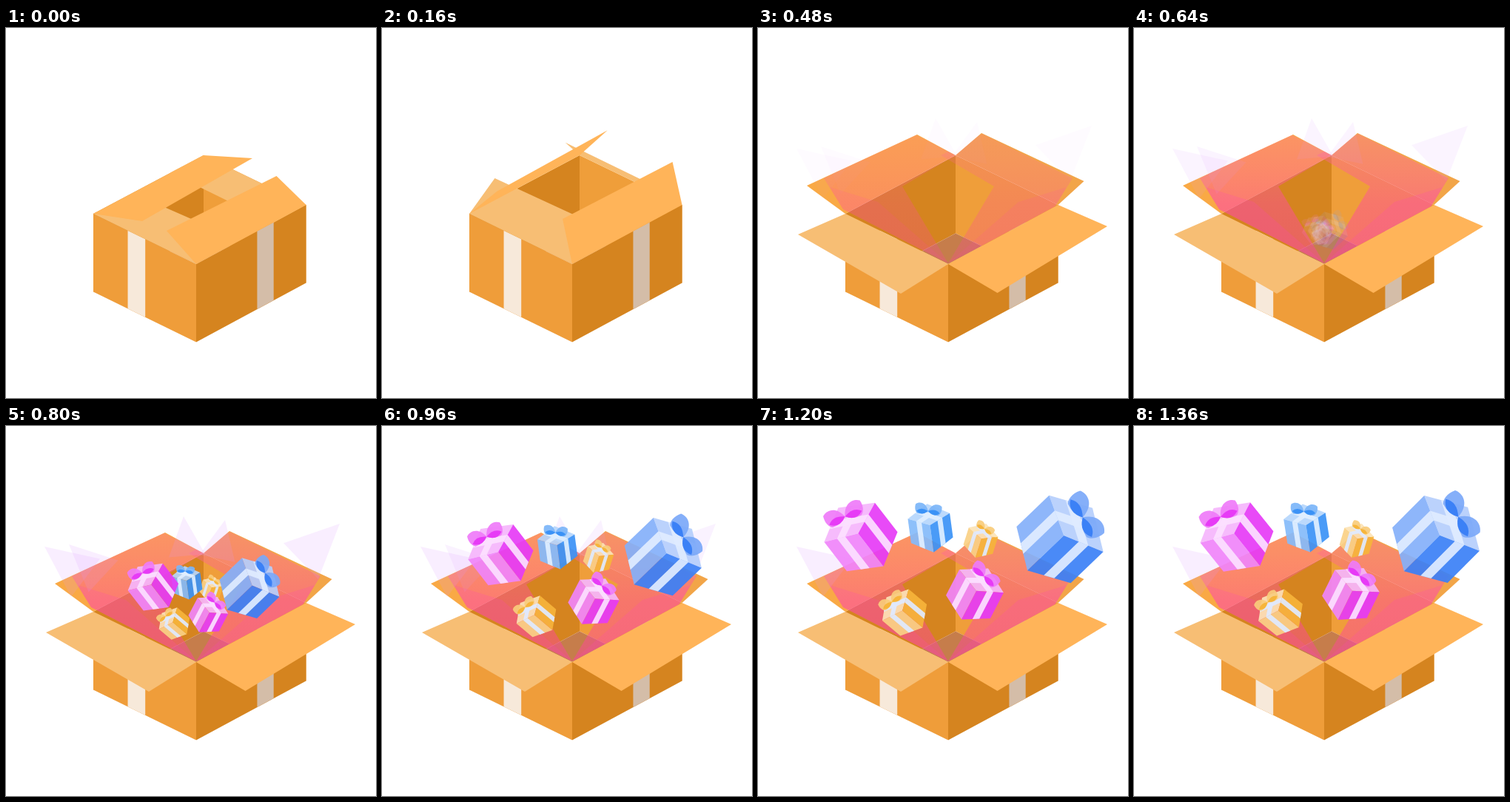
Recreate the animation shown at these times as an HTML page with a canvas. Size 500 by 500 pixels, loop 1.4 s.

```html
<!DOCTYPE html>
<html lang="en">
<head>
<meta charset="utf-8">
<title>Gift box</title>
<style>
html, body { margin: 0; width: 100%; height: 100%; overflow: hidden; background: #fff; }
canvas { display: block; width: 100vw; height: 100vh; }
</style>
</head>
<body>
<canvas id="stage" width="500" height="500"></canvas>
<script>
const ctx = document.getElementById('stage').getContext('2d');
const LOOP = 1400, STEP = 40;

// Corners of the opening, and how far the walls drop below them
const L = [118, 251], K = [267, 172], R = [405.5, 239], F = [257, 319];
const RIM = [L, K, R, F];
const DEPTH = 105.5;

const clamp = v => Math.max(0, Math.min(1, v));
const ramp = (t, a, b) => clamp((t - a) / (b - a));
const mix = (a, b, k) => a + (b - a) * k;
const mixPt = (a, b, k) => [mix(a[0], b[0], k), mix(a[1], b[1], k)];
const add = (a, b) => [a[0] + b[0], a[1] + b[1]];
const drop = (p, d = DEPTH) => [p[0], p[1] + d];

// Each flap swings its outer edge through shut, upright and open
const flap = (hinge, shut, upright, open, twist, color) => ({ hinge, poses: [shut, upright, open], twist, color });
const backLeft = flap([K, L], [66, 7], [-12, -70], [-52, -33], 5, ['#ffb459', '#f9a945']);
const backRight = flap([K, R], [-45, 24], [19, -60], [35, -31], 1, ['#f7be74', '#f2a548']);
const frontLeft = flap([F, L], [56, -30], [-11, -48], [-64, 34], 6, ['#f7be74', '#f7be74']);
const frontRight = flap([F, R], [-40, -42], [33, -53], [66.5, 34], 5, ['#ffb459', '#ffb459']);

// One hue shaded for every side of a gift
function palette(hue, bandHue = hue) {
  const tone = light => `hsl(${hue} 92% ${light}%)`;
  return {
    top: tone(85), left: tone(75), right: tone(60), bow: tone(73), fold: tone(59),
    band: `hsl(${bandHue} 100% 94%)`
  };
}
const PINK = palette(295), BLUE = palette(212), DEEP = palette(218), GOLD = palette(39, 222);

// Resting place, radius and colours
const gifts = [
  [[301, 155], 24, GOLD],
  [[233, 138], 33, BLUE],
  [[408, 153], 61, DEEP],
  [[139, 150], 50, PINK],
  [[293, 227], 39, PINK],
  [[198, 252], 32, GOLD]
];

function addPath(pts) {
  pts.forEach((p, i) => i ? ctx.lineTo(...p) : ctx.moveTo(...p));
  ctx.closePath();
}

function poly(pts, fill) {
  ctx.beginPath();
  addPath(pts);
  ctx.fillStyle = fill;
  ctx.fill();
}

function clipTo(pts) {
  ctx.beginPath();
  addPath(pts);
  ctx.clip();
}

// Strip of a four-sided face, running from side ab to side dc
function strip([a, b, c, d], from, to, fill) {
  poly([mixPt(a, b, from), mixPt(a, b, to), mixPt(d, c, to), mixPt(d, c, from)], fill);
}

function blend(a, b, k) {
  const rgb = h => [1, 3, 5].map(i => parseInt(h.slice(i, i + 2), 16));
  const p = rgb(a), q = rgb(b);
  return `rgb(${p.map((v, i) => Math.round(mix(v, q[i], k)))})`;
}

// Quadratic through the three poses, upright at 0.55
function flapShape({ hinge, poses: [shut, upright, open], twist }, s) {
  const m = 0.55;
  const swing = [0, 1].map(i =>
    shut[i] * (s - m) * (s - 1) / m +
    upright[i] * s * (s - 1) / (m * (m - 1)) +
    open[i] * s * (s - m) / (1 - m));
  const lean = twist * mix(-0.6, 1, s);
  const [near, far] = hinge;
  return [near, far, add(add(far, swing), [0, -lean]), add(add(near, swing), [0, lean])];
}

function drawFlap(f, s) {
  poly(flapShape(f, s), blend(...f.color, ramp(s, 0.6, 1)));
}

function drawBody() {
  const west = [L, F, drop(F), drop(L)], east = [F, R, drop(R), drop(F)];
  poly([L, K, drop(K), drop(L)], '#d5841f');
  poly([K, R, drop(R), drop(K)], '#ef9e3a');
  ctx.save();
  clipTo(RIM);
  poly(RIM.map(p => drop(p)), '#c67d4b');
  ctx.restore();
  poly(west, '#ef9d3a');
  poly(east, '#d5841f');
  strip(west, 0.335, 0.505, '#f7e9da');
  strip(east, 0.555, 0.705, '#d4bda8');
}

// Two mirrored beams fan out of the box floor over the given area
function drawBeams(area) {
  const pink = ctx.createLinearGradient(0, 318, 0, 140);
  pink.addColorStop(0, 'rgba(250,70,150,.5)');
  pink.addColorStop(0.45, 'rgba(255,78,155,.5)');
  pink.addColorStop(1, 'rgba(255,115,150,.36)');
  ctx.save();
  clipTo(area);
  for (const side of [-1, 1]) {
    const fan = pts => pts.map(([x, y]) => [F[0] + side * x, y]);
    poly(fan([[0, 318], [142, 245], [168, 203], [46, 143], [-10, 172], [62, 214]]), pink);
    poly(fan([[0, 318], [142, 245], [160, 215], [95, 235]]), 'rgba(250,70,185,.2)');
  }
  ctx.restore();
}

// Pale spike pointing at the tip, seen from the box floor
function drawRay(tip) {
  const dx = tip[0] - F[0], dy = tip[1] - F[1];
  const angle = Math.atan2(dy, dx), reach = Math.hypot(dx, dy) * 0.74;
  const base = [-0.17, 0.17].map(a => add(F, [reach * Math.cos(angle + a), reach * Math.sin(angle + a)]));
  poly([tip, ...base], 'rgba(215,150,255,.16)');
}

function drawGlow(t, s) {
  const glow = ramp(t, 285, 640);
  if (!glow) return;
  ctx.globalAlpha = glow;
  [flapShape(backLeft, s), flapShape(backRight, s), RIM].forEach(drawBeams);
  const rise = ramp(t, 400, 760);
  ctx.globalAlpha = rise;
  drawRay([52, 163]);
  ctx.globalAlpha = rise * (1 - ramp(t, 900, 1150));
  [[85, 160], [240, 122], [296, 127], [451, 132]].forEach(drawRay);
  ctx.globalAlpha = 1;
}

function drawBow(c) {
  for (const side of [-1, 1]) {
    ctx.save();
    ctx.scale(side, 1);
    ctx.beginPath();
    ctx.moveTo(0, 0);
    ctx.bezierCurveTo(0.12, -0.36, 0.4, -0.36, 0.54, -0.24);
    ctx.bezierCurveTo(0.58, -0.05, 0.5, 0.1, 0.42, 0.14);
    ctx.quadraticCurveTo(0.15, 0.16, 0, 0);
    ctx.fillStyle = c.bow;
    ctx.fill();
    ctx.beginPath();
    ctx.moveTo(0, 0);
    ctx.quadraticCurveTo(0.3, -0.16, 0.48, 0.04);
    ctx.quadraticCurveTo(0.25, 0.24, 0, 0);
    ctx.fillStyle = c.fold;
    ctx.fill();
    ctx.restore();
  }
}

function drawCube(c) {
  const corner = i => [Math.sin(i * Math.PI / 3), -Math.cos(i * Math.PI / 3)];
  const [top, rt, rb, bot, lb, lt] = [0, 1, 2, 3, 4, 5].map(corner);
  const mid = [0, -0.12];
  const lid = [lt, top, rt, mid], west = [lt, mid, bot, lb], east = [mid, rt, rb, bot];
  poly(lid, c.top);
  poly(west, c.left);
  poly(east, c.right);
  for (const face of [lid, [top, rt, mid, lt], west, east]) strip(face, 0.38, 0.62, c.band);
}

// Gifts ease out of the box and lean along their flight
function drawGift([rest, radius, c], t) {
  const e = Math.sin(ramp(t, 620, 1180) * Math.PI / 2);
  const settle = ramp(t, 1200, 1360);
  const tilt = Math.atan2(rest[0] - 255, 300 - rest[1]);
  const scale = radius * mix(0.4, 1, e);
  ctx.save();
  ctx.globalAlpha = 0.92 * clamp(e * 2.2);
  ctx.translate(...mixPt([255, 281], rest, e));
  ctx.rotate(tilt - 0.02 * settle);
  ctx.scale(scale, scale);
  drawCube(c);
  ctx.translate(0, -0.7);
  ctx.rotate(0.25);
  drawBow(c);
  ctx.restore();
}

function draw(t) {
  ctx.clearRect(0, 0, 500, 500);
  const s = Math.pow(clamp(t / 460), 1.65);
  drawBody();
  [backRight, frontLeft, backLeft].forEach(f => drawFlap(f, s));
  drawGlow(t, s);
  if (t > 620) {
    ctx.save();
    clipTo([[0, 0], [500, 0], [500, 215], R, F, L, [0, 215]]);
    gifts.forEach(g => drawGift(g, t));
    ctx.restore();
  }
  drawFlap(frontRight, s);
}

const start = performance.now();
function tick() {
  const t = (performance.now() - start) % LOOP;
  draw(Math.floor(t / STEP) * STEP);
  requestAnimationFrame(tick);
}
tick();
</script>
</body>
</html>
```
